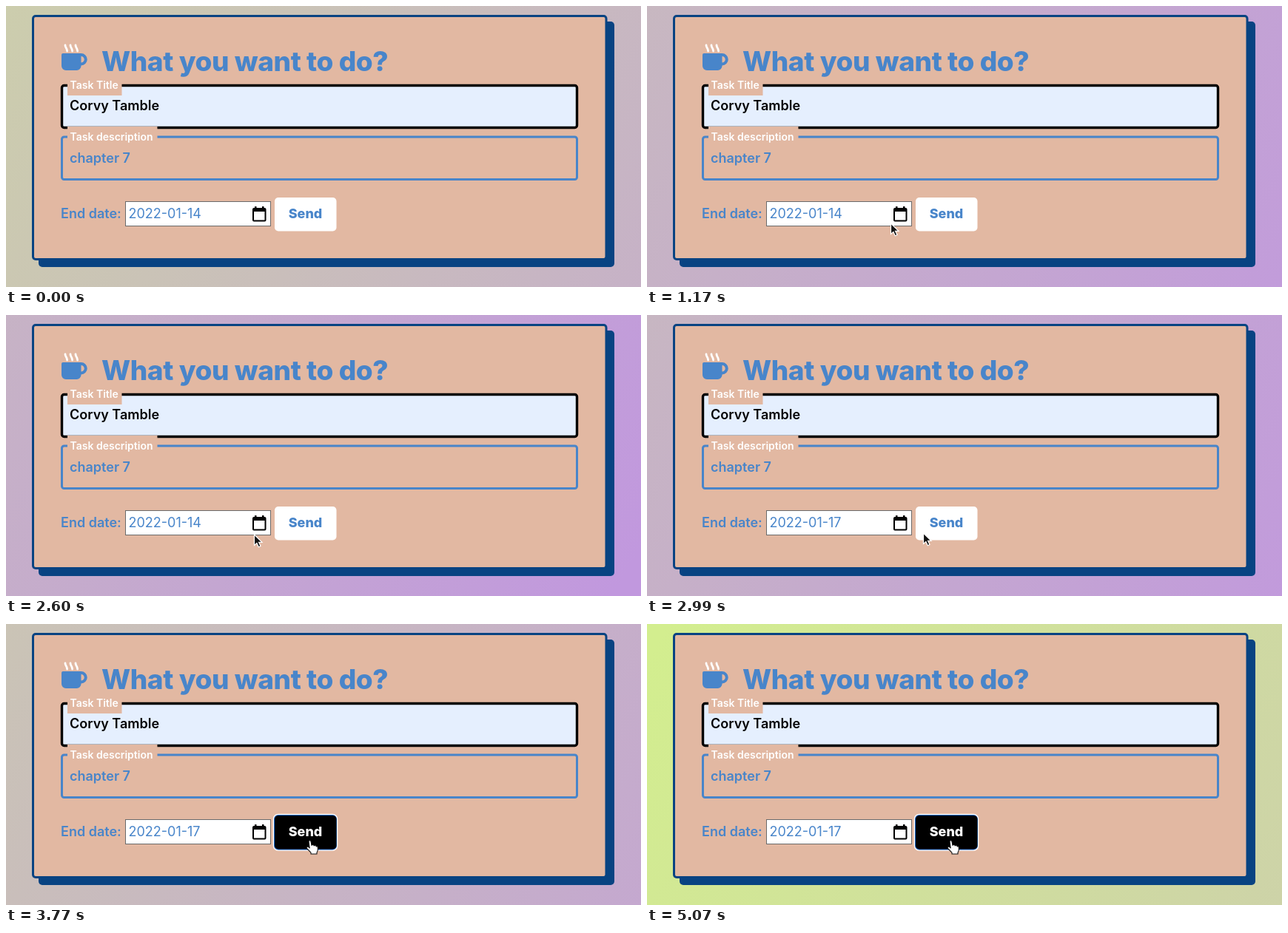
An HTML page for the animation above (5200 ms loop, 858 by 380 pixels).

```html
<!DOCTYPE html>
<html lang="en">
<head>
<meta charset="utf-8">
<title>Task form</title>
<style>
  html, body { margin: 0; width: 100%; height: 100%; overflow: hidden; }
  svg { display: block; width: 858px; height: 380px; }
  text { font-family: Inter, Roboto, "Liberation Sans", sans-serif; font-size: 18px; font-weight: 700; fill: #4885ca; }
  .heading { font-size: 37px; font-weight: 800; letter-spacing: -.4px; }
  .label { font-size: 14px; font-weight: 600; fill: #fff; }
  .value { font-weight: 600; }
  .date { font-weight: 400; }
  .send { font-weight: 800; }
  .panel { fill: #e2b8a2; }
  .blue { fill: #4885ca; }
  .navy { fill: #084382; }
</style>
</head>
<body>
<svg viewBox="0 0 858 380">
  <rect class="navy" x="44" y="21" width="778" height="332" rx="5"/>
  <rect class="navy" x="35" y="12" width="777.5" height="332" rx="5"/>
  <rect class="panel" x="38" y="15" width="771.5" height="326" rx="2"/>

  <!-- mug -->
  <g fill="none" stroke="#fff" stroke-width="2.8" stroke-linecap="round">
    <path id="steam" d="M80 53c0 4 2.6 3.6 2.6 8"/>
    <use href="#steam" x="7"/>
    <use href="#steam" x="14"/>
  </g>
  <path class="blue" fill-rule="evenodd" d="M77 64H101.5A8.2 8.2 0 0 1 101.5 80.5V81A6 6 0 0 1 95.500 87H81A6 6 0 0 1 75 81V66A2 2 0 0 1 77 64ZM101.500 68V76.500A4.200 4.200 0 0 0 101.500 68Z"/>
  <text class="heading" x="129" y="88">What you want to do?</text>

  <!-- fields -->
  <rect x="75.500" y="107.500" width="696" height="57" rx="3" fill="#e5effe" stroke="#000" stroke-width="3.400"/>
  <rect class="panel" x="83" y="100" width="73.500" height="21"/>
  <text class="label" x="86.500" y="112">Task Title</text>
  <text class="value" x="86" y="141" style="fill:#000">Corvy Tamble</text>

  <rect x="75.500" y="177" width="696" height="57.500" rx="3" fill="none" stroke="#4885ca" stroke-width="3"/>
  <rect class="panel" x="83" y="163" width="121.500" height="22"/>
  <text class="label" x="86.500" y="182">Task description</text>
  <text class="value" x="86" y="212">chapter 7</text>

  <text class="value" x="74" y="287">End date:</text>
  <rect x="161.500" y="264.500" width="196" height="33" fill="#fff" stroke="#6a6a6a"/>
  <text class="date" id="date" x="165.500" y="287"></text>
  <path fill-rule="evenodd" d="M336 271H338.500V273H346V271H348.500V273H349.500A2 2 0 0 1 351.500 275V289.500A2 2 0 0 1 349.500 291.500H335A2 2 0 0 1 333 289.500V275A2 2 0 0 1 335 273H336ZM335 278V289.500H349.500V278Z"/>

  <!-- button -->
  <g id="ring" fill="none">
    <rect x="361.500" y="257.500" width="86" height="48.500" rx="6" stroke="#fff" stroke-width="1.500"/>
    <rect x="363" y="259" width="83" height="45.500" rx="5" stroke="#1965c5" stroke-width="2"/>
  </g>
  <rect id="button" x="363" y="259" width="83.500" height="45.500" rx="5"/>
  <text class="send" id="send" x="404.500" y="287" text-anchor="middle">Send</text>

  <!-- pointers, tip at 0,0 -->
  <path id="arrow" fill="#111" stroke="#fff" stroke-width="1.200" d="M.5 0V14.500L3.900 11.400L6.300 16.700L9 15.500L6.600 10.400H11Z"/>
  <path id="hand" fill="#fff" stroke="#111" stroke-width="1.100" stroke-linejoin="round"
    d="M-2 1.200Q-2-.4-.6-.4T1 1.200L2 6.500Q2.200 5.200 3.600 5.400T5.200 7Q5.600 6 6.800 6.300T8.200 8Q8.800 7.300 9.600 7.800T10.300 9.500V12.500Q9.800 14.800 9 16V18H1V16.200L-4 11Q-5.600 9-4.200 8.300T-.8 9.800Z"/>
</svg>
<script>
  const LOOP = 5200, STEP = 130;
  const DATE_AT = 2990, HOVER_AT = 3250, FOCUS_AT = 3770;
  // time, x, y of the pointer tip
  const PATH = [[260, 304, 318], [520, 323, 291], [1820, 335, 297], [2730, 335, 297], [3250, 411, 293], [LOOP, 411, 293]];
  const $ = id => document.getElementById(id);
  const show = (node, on) => node.setAttribute("visibility", on ? "visible" : "hidden");

  function pointer(t) {
    const i = Math.max(1, PATH.findIndex(p => p[0] > t));
    const [a, b] = [PATH[i - 1], PATH[i]];
    const u = Math.min(1, Math.max(0, (t - a[0]) / (b[0] - a[0])));
    const e = u * u * (3 - 2 * u);
    return [a[1] + (b[1] - a[1]) * e, a[2] + (b[2] - a[2]) * e];
  }

  // The wide gradient drifts out to a turning point and swings back.
  function backdrop(t) {
    const d = t / 1000 - 2.2;
    const shift = .7 - (d < 0 ? .066 : .086) * d * d;
    const start = -shift * 2871;
    return `linear-gradient(120deg, rgb(211,238,143) ${start}px, rgb(193,152,222) ${start + 2871}px)`;
  }

  function draw(now) {
    const t = Math.floor(now % LOOP / STEP) * STEP;
    const hover = t >= HOVER_AT;
    const spot = `translate(${pointer(t).map(v => v.toFixed(1))})`;

    document.body.style.background = backdrop(t);
    $("date").textContent = t < DATE_AT ? "2022-01-14" : "2022-01-17";
    $("button").style.fill = hover ? "#000" : "#fff";
    $("send").style.fill = hover ? "#fff" : "#4885ca";
    show($("ring"), t >= FOCUS_AT);
    show($("arrow"), t >= PATH[0][0] && !hover);
    show($("hand"), hover);
    for (const id of ["arrow", "hand"]) $(id).setAttribute("transform", spot);
  }

  const begin = performance.now();
  function tick() {
    draw(performance.now() - begin);
    requestAnimationFrame(tick);
  }
  tick();
</script>
</body>
</html>
```
